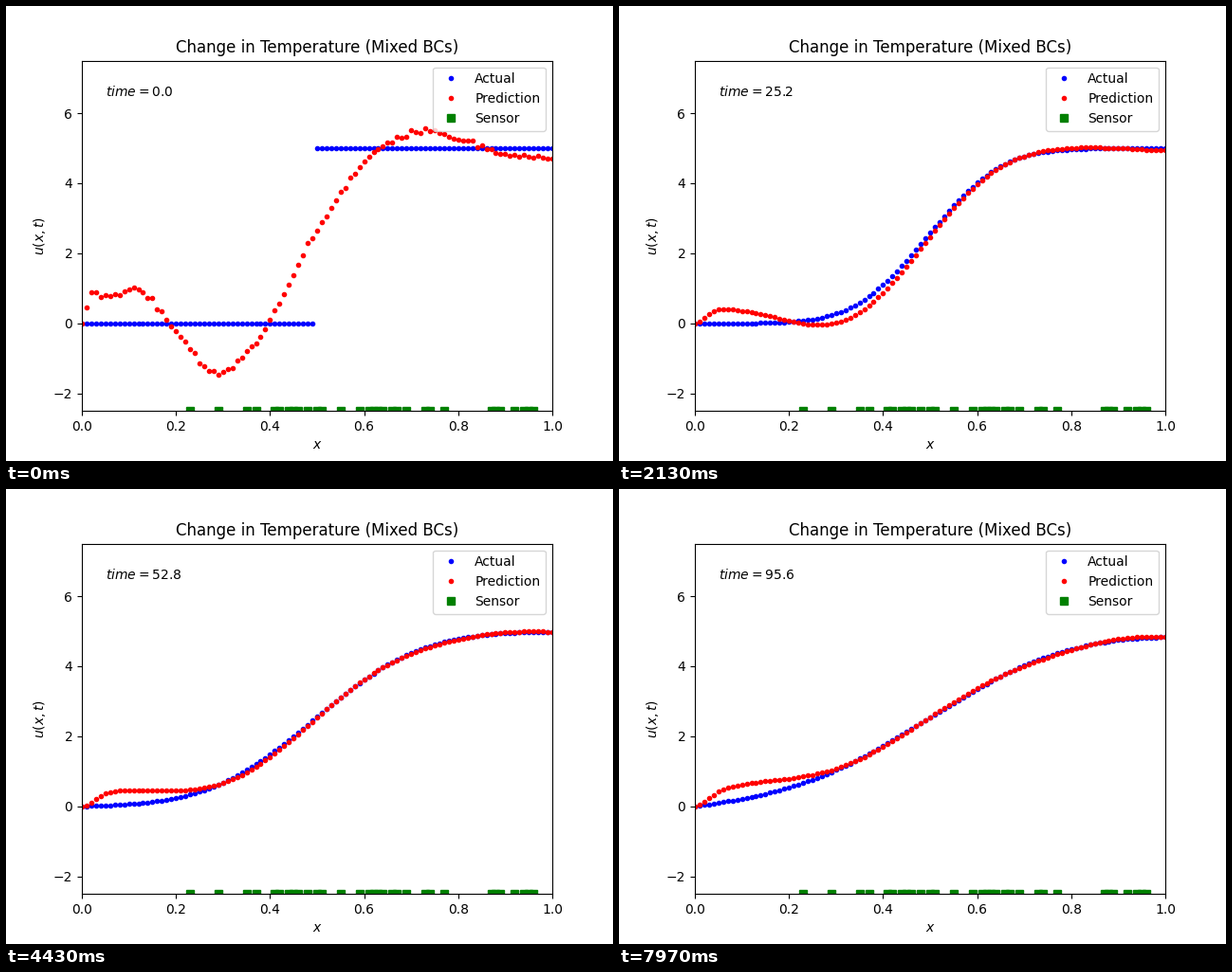
These frames come from a looping animation (640x480 px, 8000 ms). A matplotlib script:

```python
import numpy as np
import matplotlib.pyplot as plt
from matplotlib.animation import FuncAnimation

FRAMES, LOOP_MS, DT = 240, 8000, 0.4
N, DIFFUSIVITY = 100, 3e-4

x = np.arange(N + 1) / N

# Sine modes for u(0) = 0 and a closed (zero-flux) right end
k = (np.arange(N) + 0.5) * np.pi
modes = np.sin(np.outer(x, k))
weights = np.ones(N + 1)
weights[-1] = 0.5


def diffuse(u0, t):
    """Solve the heat equation from u0 up to time t."""
    coef = 2 / N * (modes.T @ (weights * u0))
    return modes @ (coef * np.exp(-DIFFUSIVITY * k**2 * t))


def smooth_curve(points):
    """Cubic Hermite curve through (x, y) points, sampled at x."""
    px, py = np.array(points).T
    slope = np.gradient(py, px)
    i = np.clip(np.searchsorted(px, x, side="right") - 1, 0, len(px) - 2)
    h = px[i + 1] - px[i]
    s = (x - px[i]) / h
    return ((1 + 2 * s) * (1 - s)**2 * py[i] + s * (1 - s)**2 * h * slope[i]
            + s**2 * (3 - 2 * s) * py[i + 1] + s**2 * (s - 1) * h * slope[i + 1])


def wall(t):
    """Rise from the fixed left end, slowly widening."""
    width = 0.012 + 0.033 * (1 - np.exp(-t / 35))
    return 1 - np.exp(-(x / width)**2)


def bias(t):
    """Lasting error: a bump left of the sensors and a faint ripple."""
    bump = 0.46 * np.exp(-(x / 0.225)**3)
    ripple = 0.03 * np.cos(2 * np.pi * (x - 0.57) / 0.36)
    return wall(t) * (bump + ripple)


step = np.where(np.arange(N + 1) >= N // 2, 5.0, 0.0)
guess = smooth_curve([(0, .95), (.06, .8), (.12, .95), (.2, -.2), (.28, -1.38),
                      (.36, -.7), (.5, 2.67), (.6, 4.6), (.72, 5.48),
                      (.86, 5), (.95, 4.75), (1, 4.7)])
guess += np.random.default_rng(4).normal(0, 0.04, N + 1)
guess *= wall(0)
start_error = guess - step - bias(0)


def predict(t):
    transient = diffuse(start_error, t) * np.exp(-(t / 40)**2)
    return diffuse(step, t) + bias(t) + transient


sensors = np.array([23, 29, 35, 37, 41, 42, 44, 45, 46, 48, 50, 51, 55, 59,
                    61, 62, 63, 64, 66, 67, 69, 73, 74, 77, 87, 88, 89, 92,
                    94, 95, 96]) / 100

fig, ax = plt.subplots(figsize=(6.4, 4.8), dpi=100)
actual, = ax.plot(x, step, "b.", label="Actual")
prediction, = ax.plot(x, guess, "r.", label="Prediction")
ax.plot(sensors, np.full(len(sensors), -2.5), "gs", label="Sensor")
clock = ax.text(0.05, 6.5, "")
ax.set(xlim=(0, 1), ylim=(-2.5, 7.5), xlabel="$x$", ylabel="$u(x,t)$",
       title="Change in Temperature (Mixed BCs)")
ax.legend(loc="upper right")


def update(frame):
    t = frame * DT
    actual.set_ydata(diffuse(step, t))
    prediction.set_ydata(predict(t))
    clock.set_text(f"$time = {t:.1f}$")
    return actual, prediction, clock


anim = FuncAnimation(fig, update, frames=FRAMES, interval=LOOP_MS / FRAMES,
                     repeat=True, repeat_delay=0)
plt.show()
```
